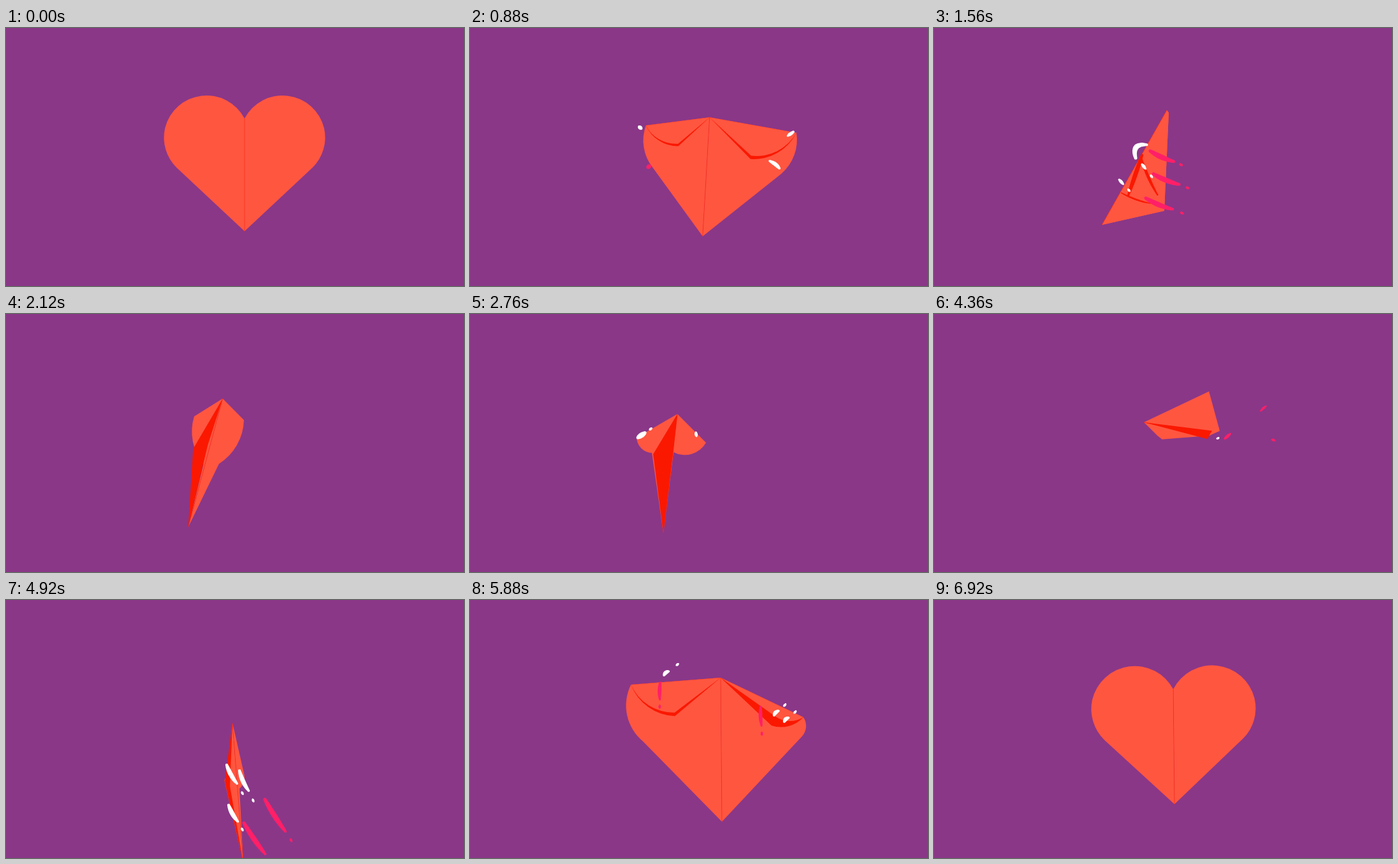
These frames come from a looping animation (720x405 px, 7 s). An HTML page with a canvas:

```html
<!DOCTYPE html>
<html>
<head>
<meta charset="utf-8">
<style>
html, body { margin: 0; height: 100%; overflow: hidden; background: #8a3788; }
canvas { display: block; }
</style>
</head>
<body>
<canvas id="stage" width="720" height="405"></canvas>
<script>
const ctx = document.getElementById('stage').getContext('2d');
const LOOP = 7000, STEP = 40, LIFE = 320;
const BACK = '#8a3788', PAPER = '#ff5640', FOLD = '#fa1800', PINK = '#ff1f68', WHITE = '#fff';
const RAD = Math.PI / 180;
const lerp = (a, b, u) => a + (b - a) * u;
const mix = (p, q, u) => p.map((n, i) => lerp(n, q[i], u));

// A pose is a list of points, then the side bulge and the fold of each lobe:
// cusp, tip, left shoulder and low corner, the same on the right, both keel corners.
// A lobe stands open at fold 0, is edge-on at .5 and lies flat on the paper at 1.
function pose(text, side = 0, foldL = .5, foldR = .5) {
  const pts = text.split(' ').map(p => p.split(',').map(Number));
  const middle = mix(pts[0], pts[1], .5);
  return { pts: pts.length > 6 ? pts : [...pts, middle, middle], bend: [side, foldL, foldR] };
}

function heart(x, y, { k = 1, left = 1, right = 1, foldL = 0, foldR = 0 } = {}) {
  const at = (dx, dy) => `${x + k * dx},${y + k * dy}`;
  const half = w => `${at(125 * w, -162)} ${at(107 * w, -100)}`;
  return pose(`${at(0, -177)} ${at(0, 0)} ${half(-left)} ${half(right)}`, .26, foldL, foldR);
}

// Moves a pose so that its tip lands on x,y, turned and scaled about it.
function place({ pts, bend }, x, y, deg = 0, k = 1) {
  const [tx, ty] = pts[1], c = Math.cos(deg * RAD) * k, s = Math.sin(deg * RAD) * k;
  return {
    bend,
    pts: pts.map(([px, py]) => [
      x + (px - tx) * c - (py - ty) * s,
      y + (px - tx) * s + (py - ty) * c])
  };
}

const wedge = pose('366,129 264,309 369,133 362,287 369,133 362,287');
const mushroom = pose('326,157 304,344 262,194 286,218 371,202 320,217 288,220 320,212', .4);
const plane = pose('512,267 586,341 494,264 474,325 577,303 580,312 504,271 517,264');
const sliver = pose('356,193 373,412 346,278 344,286 374,272 367,296 344,285 352,292', .3);
const envelope = pose('394,122 396,348 253,133 272,222 524,184 522,214', .35, 1, .8);

// The nose passes one point of the route every LEG ms and heads along it.
const FLY = 3080, LAND = 4600, LEG = 200;
const route = [[330, 165], [365, 110], [440, 130], [490, 235], [586, 341],
  [617, 311], [540, 200], [330, 170], [80, 220], [-150, 290]];

function flight(t) {
  const s = (t - 2960) / LEG, i = Math.floor(s), u = s - i;
  const knot = j => route[Math.max(0, Math.min(route.length - 1, j))];
  const [a, b, c, d] = [-1, 0, 1, 2].map(j => knot(i + j));
  const coef = k => [2 * b[k], c[k] - a[k], 2 * a[k] - 5 * b[k] + 4 * c[k] - d[k],
    3 * b[k] - a[k] - 3 * c[k] + d[k]];
  const [x, y] = [0, 1].map(k => coef(k).reduce((sum, n, e) => sum + n * u ** e, 0) / 2);
  const [vx, vy] = [0, 1].map(k => {
    const n = coef(k);
    return n[1] + 2 * n[2] * u + 3 * n[3] * u * u;
  });
  return place(plane, x, y, Math.atan2(vy, vx) / RAD - 31);
}

const keys = [
  [0, heart(375, 319)],
  [200, heart(374, 323)],
  [720, heart(377, 327, { k: 1.06, foldL: 1, foldR: 1 })],
  [1080, place(heart(0, 0, { k: 1.06, left: .4, right: 1.1, foldL: 1, foldR: 1 }), 350, 327, 8)],
  [1560, wedge],
  [2520, place(mushroom, 300, 350, 0, 1.15)],
  [2760, mushroom],
  [2880, place(mushroom, 335, 268, 8, .65)],
  [FLY, flight(FLY)],
  [LAND, place(sliver, 405, 840)],
  [4920, sliver],
  [5040, place(sliver, 365, 265)],
  [5480, place(heart(0, 0, { k: 1.1, foldL: 1, foldR: .9 }), 380, 330, -3)],
  [5880, envelope],
  [6160, heart(390, 358, { k: 1.13 })],
  [6480, heart(383, 297, { k: 1.09 })],
  [6920, place(heart(0, 0), 378, 320.5, -.6, 1.02)],
  [LOOP, heart(375, 319)]
];

function poseAt(t) {
  if (t >= FLY && t < LAND) return flight(t);
  const i = keys.findIndex(k => k[0] > t);
  const [t0, a] = keys[i - 1], [t1, b] = keys[i];
  const s = (t - t0) / (t1 - t0), u = s * s * (3 - 2 * s);
  return { pts: a.pts.map((p, j) => mix(p, b.pts[j], u)), bend: mix(a.bend, b.bend, u) };
}

// Fills a polygon of [point, bulge]; the bulge is tan(arc / 4) of the next edge.
function fill(color, ...corners) {
  let d = 'M' + corners[0][0];
  corners.forEach(([[x, y], b = 0], i) => {
    const [nx, ny] = corners[(i + 1) % corners.length][0], m = Math.abs(b);
    const r = Math.hypot(nx - x, ny - y) * (1 + b * b) / (4 * m);
    d += m < .01 ? `L${nx} ${ny}` : `A${r} ${r} 0 ${+(m > 1)} ${+(b > 0)} ${nx} ${ny}`;
  });
  ctx.fillStyle = color;
  ctx.fill(new Path2D(d + 'Z'));
}

function drawPaper({ pts, bend: [side, foldL, foldR] }) {
  const [cusp, tip, sl, ll, sr, lr, kl, kr] = pts;
  const halves = [[-1, sl, ll, foldL], [1, sr, lr, foldR]];
  for (const [dir, shoulder, low, fold] of halves)
    fill(PAPER, [cusp, dir * .69 * Math.max(0, 1 - 2 * fold)], [shoulder, dir * side], [low], [tip]);

  fill(FOLD, [cusp], [kl], [tip], [kr]);
  ctx.strokeStyle = FOLD;
  ctx.lineWidth = .5;
  ctx.beginPath();
  ctx.moveTo(...cusp);
  ctx.lineTo(...tip);
  ctx.stroke();

  for (const [dir, shoulder, , fold] of halves) {
    const open = Math.max(0, 2 * fold - 1);
    if (!open) continue;
    const dx = shoulder[0] - cusp[0], dy = shoulder[1] - cusp[1];
    const along = 1 - .46 * open;
    const flap = (color, depth) => fill(color, [cusp], [shoulder, dir * .3],
      [[cusp[0] + dx * along - dir * dy * depth, cusp[1] + dy * along + dir * dx * depth]]);
    flap(FOLD, .385 * open);
    flap(PAPER, .385 * open * .9 * open);
  }
}

let seed = 7;
const rnd = () => (seed = seed * 16807 % 2147483647) / 2147483647;
const marks = [];

// Brush marks grow and vanish around their time.
function streak(time, color, x, y, deg, len, w, bend = 0) {
  marks.push({ time, color, x, y, w, bend, dx: len * Math.cos(deg * RAD), dy: len * Math.sin(deg * RAD) });
}

// Parallel streaks from the given starts, each throwing a droplet ahead.
function spray(time, color, deg, len, w, bend, starts) {
  for (const start of starts.split(' ')) {
    const [x, y] = start.split(',').map(Number);
    const long = len * (.85 + .3 * rnd()), turn = deg + 10 * (rnd() - .5);
    const ahead = long + 8 + 8 * rnd();
    streak(time, color, x, y, turn, long, w, bend);
    streak(time, color, x + ahead * Math.cos(turn * RAD), y + ahead * Math.sin(turn * RAD), turn, 4, 4);
  }
}

streak(1560, FOLD, 327, 200, 109, 66, 7);
streak(1560, FOLD, 326, 205, 66, 62, 5, .06);
streak(1560, FOLD, 295, 259, 20, 48, 3, .08);
streak(1560, WHITE, 317, 204, -50, 27, 8, -.75);
spray(1560, PINK, 20, 48, 8, .08, '340,193 345,229 333,267');
spray(1560, WHITE, 50, 9, 5, 0, '327,214 291,238');
spray(2760, WHITE, -36, 13, 8, 0, '264,194');
streak(2760, WHITE, 355, 186, 80, 6, 5);
spray(3760, WHITE, 35, 18, 6, 0, '468,242 504,254 488,264 479,278');
spray(4920, PINK, 59, 62, 8, .04, '407,313 374,350');
spray(4920, WHITE, 63, 34, 7, .1, '347,259 367,268 350,322');
spray(5880, PINK, 92, 26, 6, .06, '299,130 457,168');
spray(5880, WHITE, -40, 10, 6, -.3, '305,118 478,181 494,191');

// Smaller bursts fly off the corners of the paper.
for (const time of [440, 840, 1160, 1960, 2360, 3080, 3400, 4080, 4280, 5200, 5480]) {
  const corners = poseAt(time).pts.slice(2, 6);
  const [cx, cy] = [0, 1].map(k => corners.reduce((s, p) => s + p[k], 0) / 4);
  for (const [x, y] of corners) {
    const inward = Math.atan2(cy - y, cx - x) / RAD;
    streak(time, rnd() < .5 ? PINK : WHITE, x, y,
      inward + 60 * (rnd() - .5), 4 + 24 * rnd(), 4 + 3 * rnd(), .2 * rnd());
  }
}

function drawMark({ time, color, x, y, dx, dy, w, bend }, t) {
  const u = (t - time) / LIFE + .5;
  if (u <= 0 || u >= 1) return;
  const from = Math.max(0, 2 * u - 1), to = Math.min(1, 2 * u);
  ctx.fillStyle = color;
  ctx.beginPath();
  for (let i = 0; i <= 24; i++) {
    const p = lerp(from, to, i / 24), bow = 2 * p * (1 - p) * bend;
    const px = x + dx * p - dy * bow, py = y + dy * p + dx * bow;
    const r = w / 2 * Math.sin(Math.PI * (.22 + .6 * i / 24)) * Math.sin(Math.PI * u);
    ctx.moveTo(px + r, py);
    ctx.arc(px, py, r, 0, 7);
  }
  ctx.fill();
}

function draw(t) {
  ctx.fillStyle = BACK;
  ctx.fillRect(0, 0, 720, 405);
  drawPaper(poseAt(t));
  marks.forEach(m => drawMark(m, t));
}

const start = performance.now();
function tick() {
  const t = (performance.now() - start) % LOOP;
  draw(Math.min(LOOP - 2 * STEP, Math.floor(t / STEP) * STEP));
  requestAnimationFrame(tick);
}
tick();
</script>
</body>
</html>
```
